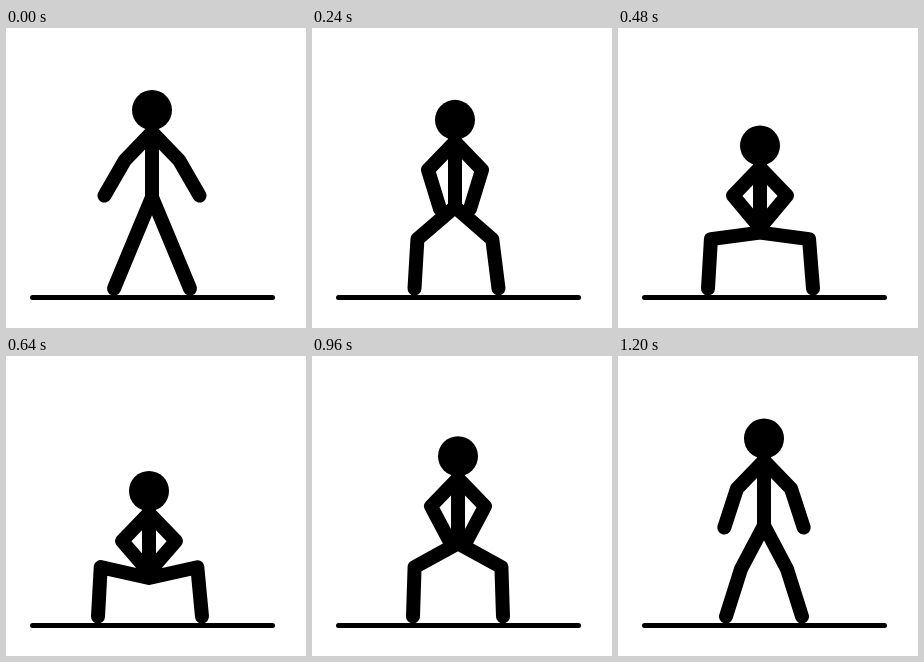
Recreate the animation shown at these times as an HTML page. Size 300 px wide and 300 px high, loop 1.28 s.

```html
<!DOCTYPE html>
<html lang="en">
<head>
<meta charset="utf-8">
<title>Squats</title>
<style>
  html, body { margin: 0; height: 100%; overflow: hidden; background: #fff; }
  svg { display: block; width: 100%; height: 100%; }
  path { fill: none; stroke: #000; stroke-width: 14; stroke-linecap: round; stroke-linejoin: round; }
  #ground { stroke-width: 5; }
</style>
</head>
<body>
<svg viewBox="0 0 300 300">
  <path id="ground" d="M26.5 269.5H266.5"/>
  <path id="body"/>
  <circle id="head" r="20"/>
</svg>
<script>
const STEP = 80, STEPS = 16;
const BONE = 49.5, FOREARM = 41, FOOT_Y = 260.5;

// step, body x, left foot x, right foot x, outward forearm angle in degrees
const keys = [
  [0, 146, 108, 184, 30],
  [2, 145, 111, 183, -2],
  [4, 141, 94, 190, -32],
  [6, 142, 90, 195, -40],
  [8, 143, 92, 196, -41],
  [12, 146, 101, 191, -28],
  [15, 146, 108, 184, 18],
];
const body = document.getElementById("body");
const head = document.getElementById("head");

function keyed(step) {
  const i = keys.findLastIndex(k => k[0] <= step);
  const a = keys[i], b = keys[i + 1] || a;
  const k = (step - a[0]) / (b[0] - a[0] || 1);
  return a.map((v, j) => v + (b[j] - v) * k);
}

// Steady descent and rise, softened where the legs straighten
function depth(step) {
  const ramp = 53 - 8.7 * Math.abs(step - STEPS / 2);
  return 4 * Math.log(1 + Math.exp(ramp / 4));
}

// Knee of a two-bone leg, bent outward; side is -1 for left, 1 for right
function knee(x, y, footX, side) {
  const dx = footX - x, dy = FOOT_Y - y, reach = Math.hypot(dx, dy);
  const bend = side * Math.sqrt(Math.max(0, BONE ** 2 - reach ** 2 / 4)) / reach;
  return [x + dx / 2 + dy * bend, y + dy / 2 - dx * bend];
}

function draw(now) {
  const step = Math.floor(now / STEP) % STEPS;
  const [, x, footL, footR, degrees] = keyed(step);
  const y = 82 + depth(step), hipY = y + 87;
  const angle = degrees * Math.PI / 180;

  const limbs = (side, footX) => {
    const elbowX = x + side * 27, elbowY = y + 50;
    const handX = elbowX + side * FOREARM * Math.sin(angle);
    const handY = elbowY + FOREARM * Math.cos(angle);
    return `M${x} ${y + 22}L${elbowX} ${elbowY}L${handX} ${handY}` +
      `M${x} ${hipY}L${knee(x, hipY, footX, side)}L${footX} ${FOOT_Y}`;
  };

  head.setAttribute("cx", x);
  head.setAttribute("cy", y);
  body.setAttribute("d", `M${x} ${y}V${hipY}` + limbs(-1, footL) + limbs(1, footR));
}

const start = performance.now();
function tick() {
  draw(performance.now() - start);
  requestAnimationFrame(tick);
}
tick();
</script>
</body>
</html>
```
